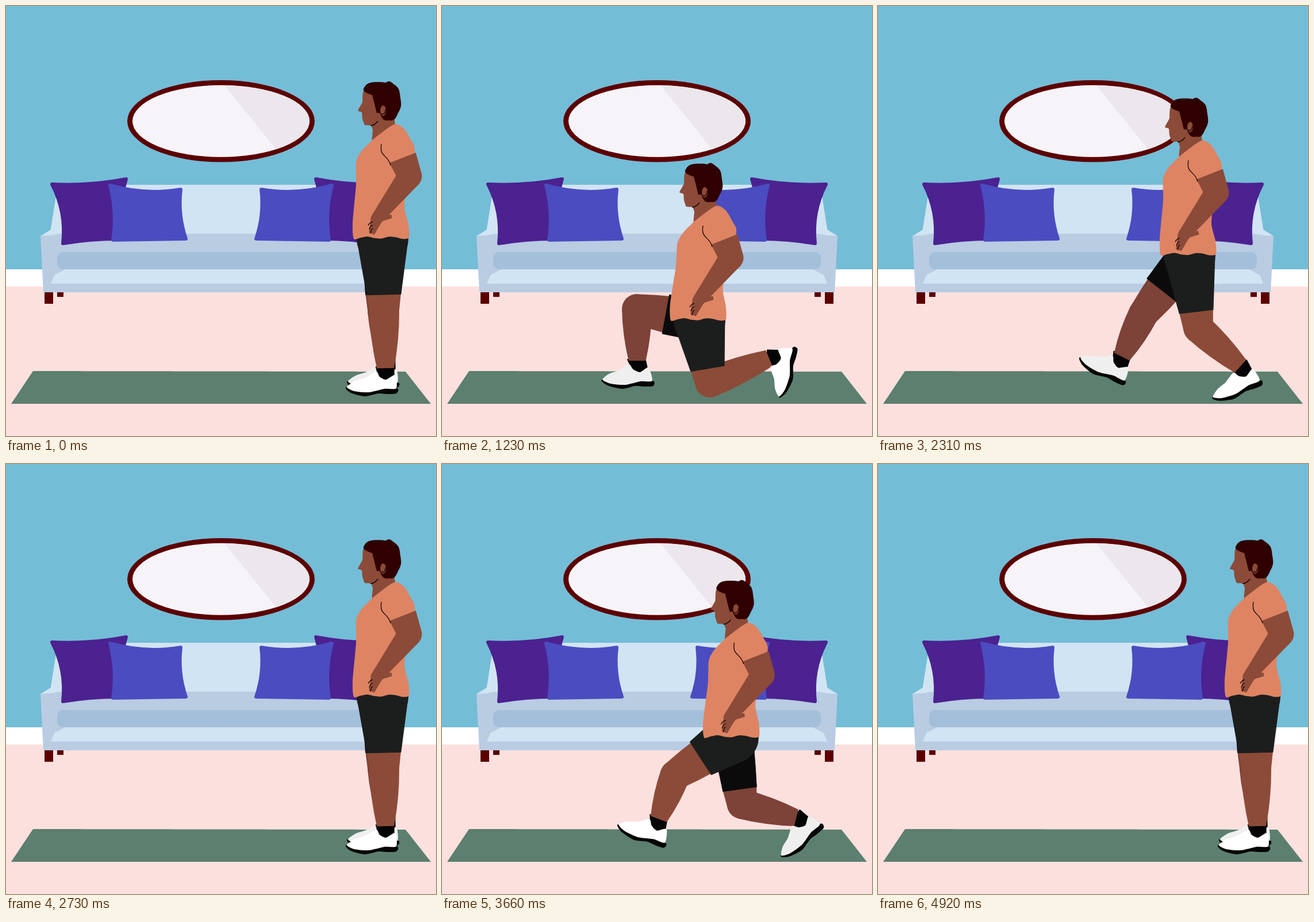
An HTML page with a canvas for the animation above (4950 ms loop, 748 by 748 pixels).

```html
<!DOCTYPE html>
<html lang="en">
<head>
<meta charset="utf-8">
<title>Alternating lunges</title>
<style>
html, body { margin: 0; height: 100%; overflow: hidden; }
canvas { display: block; width: 748px; height: 748px; }
</style>
</head>
<body>
<canvas id="stage" width="748" height="748"></canvas>
<script>
const ctx = document.getElementById('stage').getContext('2d');
const WOOD = '#5c0001', PALE = '#d1e4f3', SOFA = '#b9cce2', BAND = '#a3bfda';
const SHIRT = '#de8463', HAIR = '#300001', BLACK = '#050505';
const NEAR = { skin: '#8c4b38', shorts: '#1c1e1d', shoe: '#fff', hip: 45 };
const FAR = { skin: '#7d4238', shorts: '#0b0b0b', shoe: '#efefef', hip: 36 };

// Leg pose: knee x, y, then shoe x, y and turn in degrees.
const STAND = [658, 530, 636, 672, 0];
const FORWARD = [462, 535, 388, 639, 26];
const BACKWARD = [557, 560, 627, 673, -21];
const STEP = [-113, 28.5, 0];

// Body pose: shift x, y and lean of the waist.
const lunges = [
  { down: [620, 1230], up: [2010, 2610], body: [-199, 142, -8],
    near: [BACKWARD, [466, 655, 606, 638, -76]], far: [FORWARD, [339, 527, 324, 659, 0]] },
  { down: [3300, 3840], up: [4340, 4920], body: [-162, 137, -13],
    near: [FORWARD, [372, 550, 357, 684, 0]], far: [BACKWARD, [492, 638, 639, 630, -68]] }
];

const clamp = v => Math.max(0, Math.min(1, v));
const ease = (t, [a, b]) => {
  const u = clamp((t - a) / (b - a));
  return u * u * (3 - 2 * u);
};
// Quadratic blend through the standing (0), stepping (1) and lowest (2) pose.
const mix = (a, b, c, p) => a.map((v, i) =>
  v * (1 - p) * (2 - p) / 2 + b[i] * p * (2 - p) + c[i] * p * (p - 1) / 2);

function shape(color, draw) {
  ctx.beginPath();
  draw();
  ctx.fillStyle = color;
  ctx.fill();
}
const oval = (color, x, y, rx, ry = rx) => shape(color, () => ctx.ellipse(x, y, rx, ry, 0, 0, 7));
const rect = (color, x, y, w, h) => shape(color, () => ctx.rect(x, y, w, h));

// Closed curve through the points; tension 0 gives straight edges.
function blob(color, p, tension = 0) {
  const n = p.length;
  const at = i => p[(i + n) % n];
  shape(color, () => {
    ctx.moveTo(...p[0]);
    for (let i = 0; i < n; i++) {
      const [a, b, c, d] = [at(i - 1), at(i), at(i + 1), at(i + 2)];
      ctx.bezierCurveTo(
        b[0] + (c[0] - a[0]) * tension, b[1] + (c[1] - a[1]) * tension,
        c[0] - (d[0] - b[0]) * tension, c[1] - (d[1] - b[1]) * tension, ...c);
    }
  });
}

// Tapered segments between joints [x, y, radius], rounded where they meet.
function limb(color, joints, bulge = 0) {
  joints.slice(1).forEach(([bx, by, br], i) => {
    const [ax, ay, ar] = joints[i];
    const d = Math.hypot(bx - ax, by - ay);
    const nx = (ay - by) / d, ny = (bx - ax) / d;
    const mx = (ax + bx) / 2, my = (ay + by) / 2, mr = (ar + br) / 2 + bulge;
    shape(color, () => {
      ctx.moveTo(ax + nx * ar, ay + ny * ar);
      ctx.quadraticCurveTo(mx + nx * mr, my + ny * mr, bx + nx * br, by + ny * br);
      ctx.lineTo(bx - nx * br, by - ny * br);
      ctx.quadraticCurveTo(mx - nx * mr, my - ny * mr, ax - nx * ar, ay - ny * ar);
    });
    if (i) oval(color, ax, ay, ar);
  });
}

function curve(x0, y0, ...bezier) {
  ctx.beginPath();
  ctx.moveTo(x0, y0);
  ctx.bezierCurveTo(...bezier);
  ctx.strokeStyle = '#120404';
  ctx.lineWidth = 1.3;
  ctx.stroke();
}

// Four corners joined by edges that sag inwards.
function pillow(color, corners, sags) {
  shape(color, () => {
    ctx.moveTo(...corners[0]);
    corners.forEach(([x, y], i) => {
      const [u, v] = corners[(i + 1) % 4];
      const d = Math.hypot(u - x, v - y), s = 2 * sags[i] / d;
      ctx.quadraticCurveTo((x + u) / 2 - (v - y) * s, (y + v) / 2 + (u - x) * s, u, v);
    });
    ctx.closePath();
  });
  ctx.strokeStyle = color;
  ctx.lineWidth = 6;
  ctx.lineJoin = 'round';
  ctx.stroke();
}

function sofaHalf() {
  blob(PALE, [[76, 400], [90, 311], [375, 311], [375, 400]]);
  blob(SOFA, [[60, 400], [97, 396], [375, 396], [375, 498], [65, 498]]);
  blob(PALE, [[60, 400], [78, 389], [97, 385], [96, 394], [79, 399]]);
  shape(BAND, () => ctx.roundRect(89, 428, 300, 30, 10));
  blob(PALE, [[78, 483], [84, 468], [103, 458], [375, 458], [375, 483]]);
  rect(WOOD, 67, 498, 15, 20);
  rect(WOOD, 89, 498, 11, 8);
  pillow('#4b2290', [[80, 310], [209, 301], [195, 405], [99, 413]], [4, 4, 2, 8]);
  pillow('#4b4cc0', [[181, 312], [304, 319], [313, 405], [186, 407]], [7, 5, 0, 5]);
}

function room() {
  rect('#74bdd7', 0, 0, 748, 458);
  rect('#fff', 0, 458, 748, 30);
  rect('#fbe0de', 0, 488, 748, 260);
  blob('#5c7f6f', [[47, 635], [695, 636], [739, 692], [9, 692]]);

  oval(WOOD, 374, 200.3, 163, 71.3);
  ctx.save();
  ctx.beginPath();
  ctx.ellipse(374, 200.3, 154, 62.5, 0, 0, 7);
  ctx.clip();
  rect('#f6f4f8', 200, 120, 350, 160);
  blob('#ece7ec', [[372, 128], [560, 128], [560, 280], [494, 279]]);
  ctx.restore();

  sofaHalf();
  ctx.save();
  ctx.translate(748, 0);
  ctx.scale(-1, 1);
  sofaHalf();
  ctx.restore();
}

function leg(hip, [kneeX, kneeY, x, y, deg], flex, look) {
  const foot = new DOMMatrix().translate(x, y).rotate(deg).multiply(new DOMMatrix([1, 0, flex, 1, 0, 0]));
  const ankle = foot.transformPoint({ x: 24, y: -42 });
  const onFoot = draw => {
    ctx.save();
    ctx.setTransform(foot);
    draw();
    ctx.restore();
  };

  onFoot(() => limb(BLACK, [[23, -47, 16.5], [27, -18, 13]]));
  limb(look.skin, [[...hip, 34], [kneeX, kneeY, 26], [ankle.x, ankle.y, 15]], 5);
  onFoot(() => {
    blob(BLACK, [[-44, -9], [-36, 1], [-12, 7], [12, 2], [28, 3], [43, 2], [44, -7], [0, -12]], .12);
    blob(look.shoe, [[-43, -9], [-30, -19], [-12, -25], [8, -36], [14, -27], [25, -22], [41, -30], [43, -7], [22, -6], [-5, 0], [-30, -2]], .12);
  });

  // The hem rides up as the thigh lifts forward.
  const lift = clamp((hip[0] - kneeX) / 110), along = .78 - .24 * lift;
  const hem = [hip[0] + (kneeX - hip[0]) * along, hip[1] + (kneeY - hip[1]) * along, 30 + 5 * lift];
  oval(look.shorts, ...hip, look.hip);
  limb(look.shorts, [[...hip, look.hip], hem]);
}

function head() {
  blob(NEAR.skin, [[622, 148], [620, 167], [612, 182], [619, 185], [620, 196], [624, 207], [635, 208], [638, 216], [637, 234], [660, 226], [677, 207], [665, 150]], .05);
  const lump = (x, y, rx, ry, n) => blob(HAIR, Array.from({ length: 4 * n }, (_, i) => {
    const a = i * Math.PI / (2 * n), r = 1 + .03 * Math.sin(n * a);
    return [x + rx * r * Math.cos(a), y + ry * r * Math.sin(a)];
  }), 1 / 6);
  lump(666, 166, 21, 34, 7);
  lump(647, 144, 25, 12, 5);
  limb(HAIR, [[643, 150, 7], [648, 186, 3]]);
  oval(NEAR.skin, 656, 182, 5, 9);
  curve(653, 187, 656, 190, 660, 187, 660, 180);
  curve(634, 208, 640, 208, 644, 204, 647, 200);
}

function arm() {
  limb(NEAR.skin, [[690, 264, 24.5], [702.5, 296, 21], [645, 370, 10.5], [636, 396, 5]]);
  limb(NEAR.skin, [[648, 370, 6], [671, 366, 3]]);
  curve(653, 240, 649, 264, 664, 257, 669, 277);
  for (let i = 0; i < 3; i++) curve(630 + 2 * i, 382 + 7 * i, 631 + 2 * i, 378 + 6 * i, 634 + i, 377 + 5 * i, 638, 375 + 6 * i);
}

function shirt(lean) {
  const hem = Array.from({ length: 9 }, (_, i) => [701 - 12 * i, 403 + 2 * Math.sin(1.8 * i)]);
  const outline = [[640, 231], [675, 206], [692, 213], [705, 234], [711, 252], [698, 310], [693, 350], [700, 380],
    ...hem, [603, 378], [609, 310], [609, 272], [618, 253]];
  blob(SHIRT, outline.map(([x, y]) => [x + lean * clamp((y - 260) / 130), y]), .12);
}

function person(t) {
  const move = lunges[t < 2900 ? 0 : 1];
  const p = 2 * (ease(t, move.down) - ease(t, move.up));
  const [dx, dy, lean] = mix([0, 0, 0], STEP, move.body, p);
  const hip = [655 + dx + lean, 405 + dy];
  const farStand = [655, 530, 638, 662, 0];
  leg(hip, mix(farStand, ...move.far, p), p * .1, FAR);
  leg(hip, mix(STAND, ...move.near, p), p * .1, NEAR);
  ctx.save();
  ctx.translate(dx, dy);
  head();
  shirt(lean);
  arm();
  ctx.restore();
}

const start = performance.now();
function frame() {
  const t = (performance.now() - start) % 4950;
  room();
  person(Math.floor(t / 30) * 30);
  requestAnimationFrame(frame);
}
frame();
</script>
</body>
</html>
```
